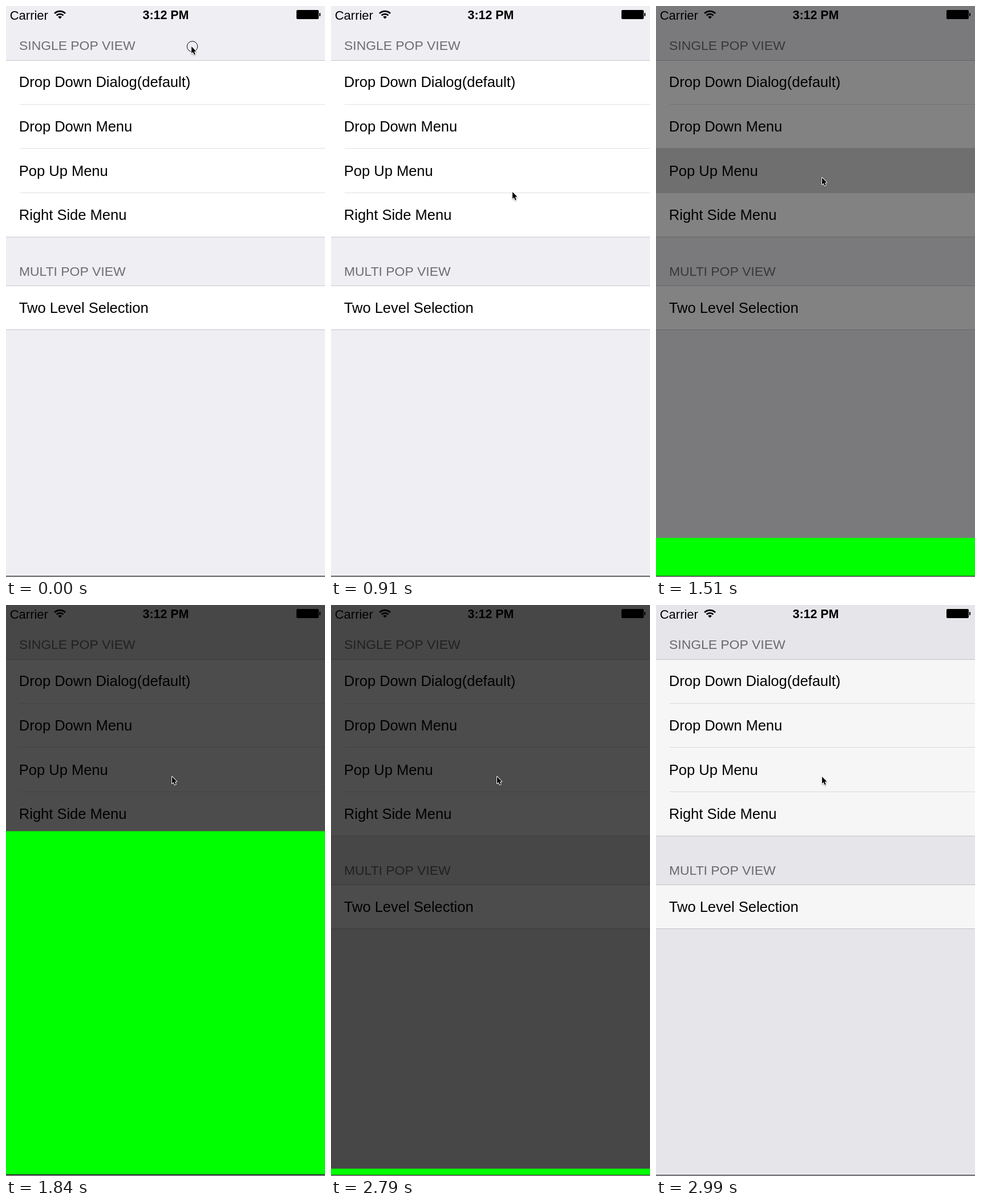
Recreate the animation shown at these times as an HTML page with a canvas. Size 559 by 1001 pixels, loop 3090 ms.

```html
<!DOCTYPE html>
<html lang="en">
<head>
<meta charset="utf-8">
<title>Pop up menu</title>
<style>
  html, body { margin: 0; width: 100%; height: 100%; overflow: hidden; background: #eeeef3; }
  canvas { display: block; }
</style>
</head>
<body>
<canvas id="stage" width="559" height="1001"></canvas>
<script>
const ctx = document.getElementById('stage').getContext('2d');
const W = 559, FLOOR = 999, PANEL = 601.5, LOOP = 3090;
const FONT = '"Liberation Sans", Arial, sans-serif';

const TICKS = [0, 50, 440, 500, 560, 620, 680, 740, 800, 860, 910, 970, 1025, 1080,
  1320, 1380, 1440, 1510, 1690, 1840, 2620, 2730, 2790, 2910, 2990];

// Pointer path: time, x, y
const PATH = [[380, 325, 71], [620, 319, 215], [830, 317, 336], [910, 318, 326],
  [970, 310, 321], [1080, 291, 301]];

const ROWS = [
  ['Drop Down Dialog(default)', 142],
  ['Drop Down Menu', 220],
  ['Pop Up Menu', 297.5],
  ['Right Side Menu', 375],
  ['Two Level Selection', 537.5]
];

const progress = (t, from, to) => Math.min(1, Math.max(0, (t - from) / (to - from)));
const ease = p => p * p * (3 - 2 * p);

function rect(color, x, y, w, h) {
  ctx.fillStyle = color;
  ctx.fillRect(x, y, w, h);
}

function text(str, x, y, size, color = '#000', weight = 'normal', align = 'left') {
  ctx.font = `${weight} ${size}px ${FONT}`;
  ctx.fillStyle = color;
  ctx.textAlign = align;
  ctx.fillText(str, x, y);
}

function ring(x, y, r, color, width = 1, from = 0, to = 2 * Math.PI) {
  ctx.beginPath();
  ctx.arc(x, y, r, from, to);
  ctx.strokeStyle = color;
  ctx.lineWidth = width;
  ctx.stroke();
}

function roundBox(x, y, w, h, r) {
  ctx.fillStyle = '#000';
  ctx.beginPath();
  ctx.roundRect(x, y, w, h, r);
  ctx.fill();
}

function statusBar() {
  text('Carrier', 6.7, 23.5, 22);
  text('3:12 PM', 280, 23, 21.4, '#000', 'bold', 'center');
  for (const [r, width] of [[2.4, 4.8], [8.4, 2.7], [13.4, 2.9]])
    ring(94.5, 22.5, r, '#000', width, -Math.PI * 0.75, -Math.PI * 0.25);
  roundBox(509, 7, 39, 16, 2);
  roundBox(549, 12, 2, 6, 1);
}

function list(highlight) {
  rect('#eeeef3', 0, 0, W, FLOOR);
  rect('#fff', 0, 95, W, 310);
  rect('#fff', 0, 490, W, 77);
  for (const y of [172, 249, 327]) rect('#e0e0e3', 24, y, W, 1);
  for (const y of [95, 404.5, 490, 567]) rect('#c8c7cc', 0, y, W, 1);
  if (highlight) {
    ctx.globalAlpha = highlight;
    rect('#d9d9d9', 0, 249, W, 79);
    ctx.globalAlpha = 1;
  }
  text('SINGLE POP VIEW', 23, 77, 22.9, '#6d6d72');
  text('MULTI POP VIEW', 23, 472.5, 22.9, '#6d6d72');
  for (const [label, y] of ROWS) text(label, 22.8, y, 25.5);
}

function pointerAt(t) {
  let i = 0;
  while (i < PATH.length - 2 && t > PATH[i + 1][0]) i++;
  const [t0, x0, y0] = PATH[i], [t1, x1, y1] = PATH[i + 1];
  const p = progress(t, t0, t1);
  return [x0 + (x1 - x0) * p, y0 + (y1 - y0) * p];
}

function pointer(x, y, pressed) {
  if (pressed) {
    ring(x + 1.5, y, 8.4, '#fff');
    ring(x + 1.5, y, 9.2, '#000');
  }
  ctx.save();
  ctx.translate(x, y);
  ctx.beginPath();
  for (const [px, py] of [[0, 0], [0, 12], [2.7, 9.5], [4.6, 14.3], [6.7, 13.4], [4.7, 8.8], [8.4, 8.6]])
    ctx.lineTo(px, py);
  ctx.closePath();
  ctx.lineJoin = 'round';
  ctx.lineWidth = 2;
  ctx.strokeStyle = '#fff';
  ctx.shadowColor = 'rgba(0,0,0,.35)';
  ctx.shadowBlur = 2;
  ctx.shadowOffsetY = 1;
  ctx.stroke();
  ctx.shadowColor = 'transparent';
  ctx.fillStyle = '#000';
  ctx.fill();
  ctx.restore();
}

function draw(time) {
  const t = TICKS.findLast(tick => tick <= time);
  const dim = 0.7 * (progress(t, 1440, 1540) - progress(t, 2790, 3001));
  const open = ease(progress(t, 1448, 1748)) - ease(progress(t, 2640, 2803));
  const highlight = t >= 1380 ? 1 - progress(t, 1510, 1600) : 0;
  const pressed = t < 50 || (t >= 1320 && t < 1440) || t === 2620;

  list(highlight);
  statusBar();
  rect(`rgba(0,0,0,${dim})`, 0, 0, W, FLOOR);
  // Fully open, the panel ends just above the floor.
  rect('#0f0', 0, FLOOR - (PANEL + 1) * open, W, PANEL);
  rect('#111', 0, FLOOR, W, 1);
  rect('#ccc', 0, FLOOR + 1, W, 1);
  pointer(...pointerAt(t), pressed);
}

const start = performance.now();
function tick() {
  draw((performance.now() - start) % LOOP);
  requestAnimationFrame(tick);
}
tick();
</script>
</body>
</html>
```
